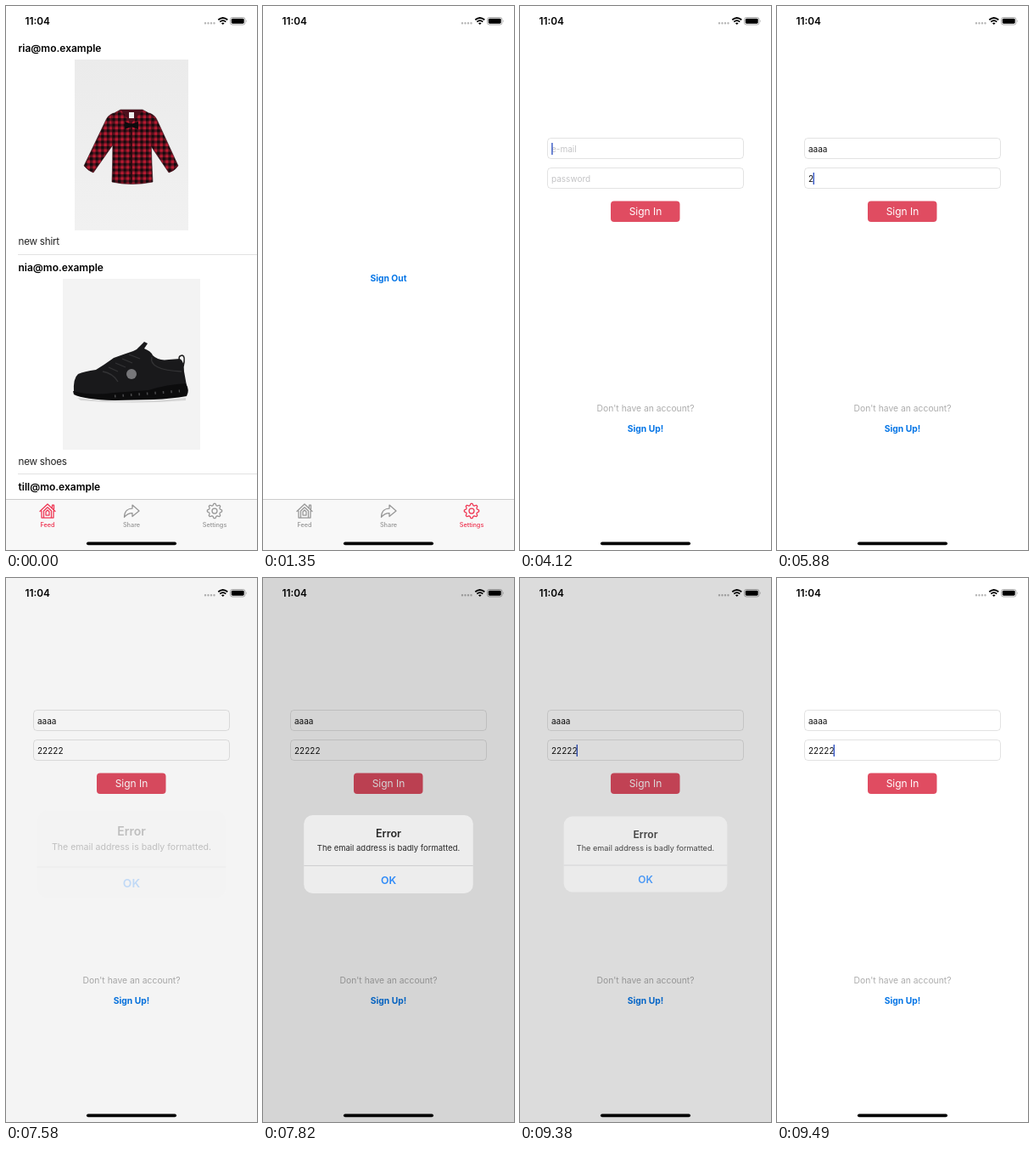
Animation of 296 by 640 pixels, one loop 9.54 s. Source, as an HTML page:

```html
<!DOCTYPE html>
<html lang="en">
<head>
<meta charset="utf-8">
<title>Feed and sign-in</title>
<style>
  html, body { margin: 0; width: 100%; height: 100%; overflow: hidden; background: #fff; }
  svg { display: block; width: 100vw; height: 100vh; }
  text { font-family: Inter, Roboto, sans-serif; white-space: pre; }
  .mid { text-anchor: middle; }
  .mail { font-size: 12px; font-weight: 600; }
  .caption { font-size: 11.7px; letter-spacing: -.25px; fill: #222; }
  .link { font-size: 10.3px; font-weight: 700; fill: #0575e6; }
  .input { font-size: 10px; }
  .field { fill: none; stroke: #000; stroke-opacity: .11; }
  .tab { color: #969696; }
  .tab.on { color: #ee3350; }
  .tab text { font-size: 7.3px; font-weight: 500; fill: currentColor; }
  .tab path { fill: none; stroke: currentColor; stroke-width: 1.25; stroke-linejoin: round; stroke-linecap: round; }
  .line { stroke: #e2e2e2; }
</style>
</head>
<body>
<svg viewBox="0 0 296 640">
  <defs>
    <pattern id="plaid" width="6.6" height="6.6" patternUnits="userSpaceOnUse">
      <rect width="6.6" height="6.6" fill="#b81a30"/>
      <path d="M0 0h3.3v6.6h-3.3zM0 0h6.6v3.3h-6.6z" fill="#160c10" fill-opacity=".6"/>
      <rect width="3.3" height="3.3" fill="#120b0e"/>
    </pattern>
    <linearGradient id="backdrop" x2="0" y2="1">
      <stop stop-color="#ebebeb"/><stop offset="1" stop-color="#f1f1f1"/>
    </linearGradient>
  </defs>
  <rect width="296" height="640" fill="#fff"/>

  <g id="feed">
    <text class="mail" x="14.5" y="54">ria@mo.example</text>
    <rect x="81" y="63" width="134" height="201" fill="url(#backdrop)"/>
    <g fill="url(#plaid)" stroke="#2a0d14" stroke-width=".6">
      <path d="M127 126Q120 128 117 136L92 188Q97 194 103 196L127 162Z"/>
      <path d="M169 126Q176 128 179 136L203 188Q199 194 192 196L169 162Z"/>
      <path d="M135 122L161 122L172 128Q170 150 173 207Q148 212 125 207Q127 150 124 128Z"/>
    </g>
    <path d="M135 122H161L148 138Z" fill="#4d101d"/>
    <rect x="145" y="125" width="6" height="7" fill="#eee"/>
    <path d="M148 138V208" stroke="#240b11" stroke-width="1.5"/>
    <path d="M140 136L148 139L156 136V145L148 142L140 145Z" fill="#0b0b0d"/>
    <text class="caption" x="14.5" y="281">new shirt</text>
    <path class="line" d="M14 292.5H296"/>

    <text class="mail" x="14.5" y="312">nia@mo.example</text>
    <rect x="67" y="321" width="162" height="201" fill="#f3f3f3"/>
    <path d="M84 461Q140 469 212 461V464Q150 469 88 464Z" fill="#d6d6d6"/>
    <path d="M205 420Q202 411 208 411Q212 412 209 424" fill="none" stroke="#222" stroke-width="1.6"/>
    <path d="M80 454Q79 438 85 433Q92 430 106 428Q116 422 127 414Q138 410 150 406Q155 404 157 401L163 395L167 397L163 403Q171 406 173 411Q180 418 192 416L205 415Q210 417 210 430L214 452Q180 460 140 459Q100 460 80 454Z" fill="#19191b"/>
    <path d="M114 430Q126 432 132 442M121 425l11 5M129 420l12 5M137 415l12 5M145 410l13 5M172 413Q168 428 207 430" fill="none" stroke="#333335" stroke-width="1.3"/>
    <path d="M79 453Q100 459 127 455L168 452Q190 445 212 444Q217 452 213 459Q195 462 174 463L128 464Q92 463 80 457Z" fill="#0c0c0d"/>
    <path d="M128 459L205 453" stroke="#4a4a4c" stroke-width="3" stroke-dasharray="1.5 8"/>
    <circle cx="148" cy="433" r="6" fill="#77777a"/>
    <text class="caption" x="14.5" y="539.5">new shoes</text>
    <path class="line" d="M14 550.5H296"/>
    <text class="mail" x="14.5" y="570">till@mo.example</text>
  </g>

  <text id="signOut" class="link mid" x="148" y="324">Sign Out</text>

  <rect y="580" width="296" height="60" fill="#f8f8f8"/>
  <path d="M0 580.5H296" stroke="#ccc"/>
  <g id="feedTab" class="tab">
    <path d="M40 594.5L49 586L58 594.5M54.5 590V587H56.5V592M42 594V602H56V594M44.5 602V594L49 589.8L53.5 594V602M47 599V595L49 593L51 595V599Z"/>
    <text class="mid" x="49" y="612.7">Feed</text>
  </g>
  <g class="tab">
    <path d="M139.5 601.5C139.5 594 144 591 149 591V587L157 594L149 600.5V596.5C144.5 596.5 142 598 139.5 601.5Z"/>
    <text class="mid" x="148" y="612.7">Share</text>
  </g>
  <g id="settingsTab" class="tab">
    <path id="gear"/>
    <path d="M249 594a3 3 0 1 1-6 0a3 3 0 1 1 6 0Z"/>
    <text class="mid" x="246" y="612.7">Settings</text>
  </g>

  <g id="signIn">
    <rect width="296" height="640" fill="#fff"/>
    <rect class="field" x="32.5" y="155.5" width="231" height="24" rx="4"/>
    <rect class="field" x="32.5" y="190.5" width="231" height="24" rx="4"/>
    <text id="email" class="input" x="37" y="171.5"></text>
    <text id="password" class="input" x="37" y="206.5"></text>
    <rect id="caret" width="1.4" height="14" fill="#3455c4"/>
    <rect x="107" y="229.5" width="81.5" height="24.5" rx="4" fill="#e04c61"/>
    <text id="signInLabel" class="mid" x="148" y="246" font-size="12" fill="#fff">Sign In</text>
    <text class="mid" x="148" y="477" font-size="10.35" fill="#adadad">Don't have an account?</text>
    <text class="link mid" x="148" y="501">Sign Up!</text>
  </g>

  <text x="22.5" y="22" font-size="11.8" font-weight="600">11:04</text>
  <path d="M235 20.3h11" stroke="#b5b5b5" stroke-width="2.4" stroke-linecap="round" stroke-dasharray="0 3.5"/>
  <g fill="none" stroke="#000" stroke-width="1.8">
    <path d="M250.3 16.3Q255.8 11.6 261.3 16.3M252.3 18.6Q255.8 15.6 259.3 18.6"/>
    <path d="M254 20.2Q255.8 18.8 257.6 20.2L255.8 22Z" fill="#000" stroke="none"/>
  </g>
  <rect x="264.5" y="13.5" width="17.5" height="8.5" rx="2.4" fill="none" stroke="#999" stroke-width=".8"/>
  <rect x="265.8" y="14.8" width="14.9" height="5.9" rx="1.4"/>
  <path d="M283.2 16.2q1.2 1.5 0 3Z" fill="#999"/>
  <rect x="95" y="630.4" width="106" height="3.8" rx="1.9"/>

  <rect id="dim" width="296" height="640"/>
  <g id="alert">
    <rect x="51.7" y="280.5" width="192.6" height="89" rx="10" fill="#f3f3f3"/>
    <path id="okPressed" d="M51.7 338H244.3V359.5a10 10 0 0 1-10 10H61.7a10 10 0 0 1-10-10Z" fill-opacity=".09"/>
    <path d="M51.7 338H244.3" stroke="#c6c6c8" stroke-width=".8"/>
    <g class="mid">
      <text x="148" y="306.1" font-size="12.1" font-weight="600">Error</text>
      <text x="148" y="320.8" font-size="9.15">The email address is badly formatted.</text>
      <text x="148" y="358.5" font-size="11.9" font-weight="600" fill="#0a7aff">OK</text>
    </g>
  </g>
</svg>
<script>
const LOOP = 9540;
const $ = id => document.getElementById(id);
const show = (id, visible) => $(id).style.display = visible ? '' : 'none';
const opacity = (id, value) => $(id).style.opacity = value;
const countPast = (times, t) => times.filter(time => time <= t).length;

// The screen refreshes only at these times while something is animating.
const REFRESH = [0, 2930, 3050, 3160, 3270, 3380, 3940, 7580, 7710, 7820, 7930, 8040, 9160, 9270, 9380, 9490];
const EMAIL_KEYS = [4270, 4500, 4700, 4900];
const PASSWORD_KEYS = [5880, 6100, 6310, 6500, 6660];

// Eight-toothed gear around (246, 594).
$('gear').setAttribute('d', 'M' + Array.from({ length: 32 }, (_, i) => {
  const angle = (i - .5) * Math.PI / 16;
  const radius = i % 4 < 2 ? 8.7 : 6.7;
  return `${246 + radius * Math.cos(angle)} ${594 + radius * Math.sin(angle)}`;
}).join('L') + 'Z');

function fillField(id, typed, placeholder) {
  $(id).textContent = typed || placeholder;
  $(id).style.fill = typed ? '#111' : '#c3c3c5';
}

// Critically damped slide from the bottom edge.
function sheetOffset(t) {
  const x = Math.max(0, t - 2940) * .01705;
  return 640 * (1 + x) * Math.exp(-x);
}

function alertLevel(t) {
  if (t < 7580 || t >= 9490) return 0;
  if (t < 8040) return 1 - Math.exp((7540 - t) / 163);
  if (t < 9270) return 1;
  return t < 9380 ? .94 : .69;
}

function render(t) {
  const held = REFRESH[countPast(REFRESH, t) - 1];
  const onFeed = t < 1350;
  show('feed', onFeed);
  show('signOut', !onFeed);
  $('feedTab').classList.toggle('on', onFeed);
  $('settingsTab').classList.toggle('on', !onFeed);
  opacity('signOut', t >= 2770 && t < 2930 ? .25 : 1);

  show('signIn', t >= 2930);
  $('signIn').setAttribute('transform', `translate(0 ${sheetOffset(held)})`);
  const letters = countPast(EMAIL_KEYS, t);
  const digits = countPast(PASSWORD_KEYS, t);
  fillField('email', 'a'.repeat(letters), 'e-mail');
  fillField('password', '2'.repeat(digits), 'password');
  $('caret').setAttribute('x', digits ? 36.6 + 6 * digits : 37.2 + 5.5 * letters);
  $('caret').setAttribute('y', digits ? 196 : 161);
  const pressing = t >= 7170 && t < 7430;
  show('caret', t >= 3940 && !pressing && (t < 7580 || t >= 9270));
  opacity('signInLabel', pressing ? (t < 7290 ? .55 : .3) : 1);

  const level = alertLevel(held);
  const scale = t < 8040 ? 1 + .2 * (1 - level) : 1;
  opacity('dim', .2 * level);
  opacity('alert', level);
  $('alert').setAttribute('transform', `translate(148 325) scale(${scale}) translate(-148 -325)`);
  show('okPressed', t >= 9160 && t < 9270);
}

const start = performance.now();
function tick() {
  render((performance.now() - start) % LOOP);
  requestAnimationFrame(tick);
}
tick();
</script>
</body>
</html>
```
